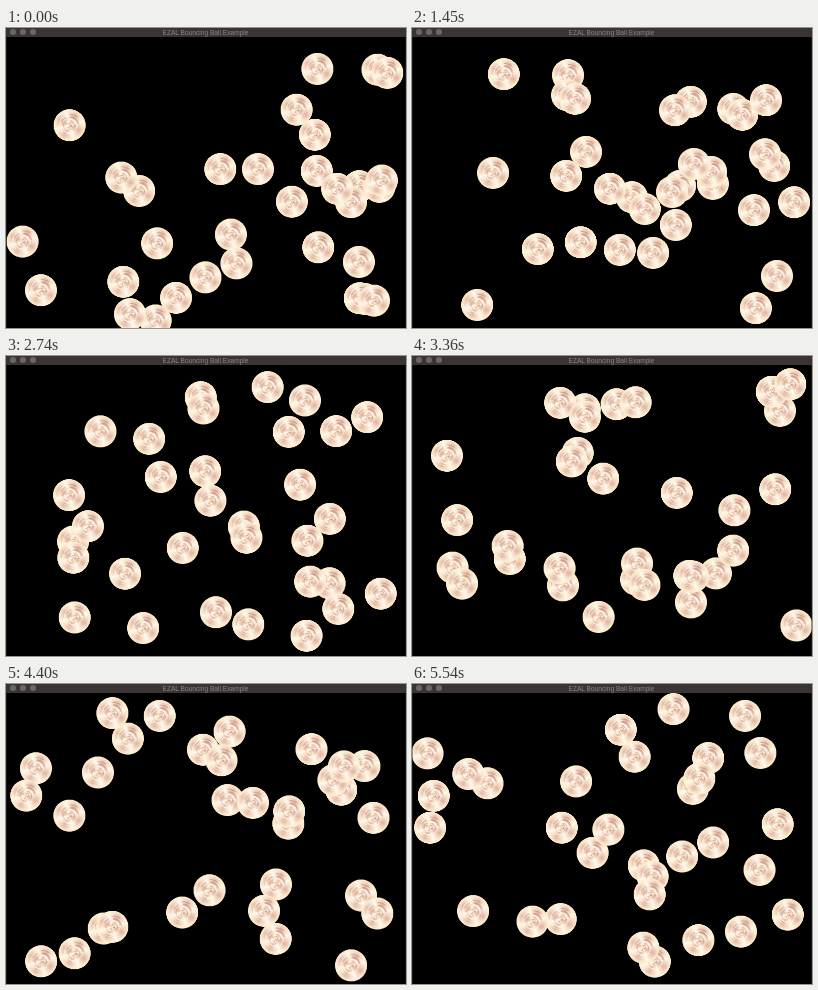
An HTML page with a canvas for the animation above (5640 ms loop, 400x300 px).

```html
<!DOCTYPE html>
<html lang="en">
<head>
<meta charset="utf-8">
<title>Bouncing balls</title>
<style>
  html, body { margin: 0; width: 100%; height: 100%; overflow: hidden; background: #000; }
  canvas { position: absolute; left: 0; top: 0; width: 400px; height: 300px; }
  .bar { position: absolute; left: 0; top: 0; width: 400px; height: 9px; background: #3a3533; }
  .bar i { position: absolute; top: 1px; width: 6px; height: 6px; border-radius: 50%; background: #6d6866; }
  .bar span {
    position: absolute; left: 0; width: 399px; top: 0; text-align: center; white-space: nowrap;
    font: 6.6px/9px "Liberation Sans", Arial, sans-serif; color: #8b8684;
  }
</style>
</head>
<body>
<canvas id="stage" width="400" height="300"></canvas>
<div class="bar">
  <i style="left:4px"></i><i style="left:14px"></i><i style="left:24px"></i>
  <span>EZAL Bouncing Ball Example</span>
</div>
<script>
const LOOP = 5640, LAST = 5540, MIDDLE = 2740;
const STEP = LAST / 119;
const SPEED = 0.01615;
const R = 16, SIZE = 2 * R + 2;
const WALLS = { left: 14.5, right: 384.5, top: 25, bottom: 293 };

// Each ball: place at MIDDLE, then whole-number speed along x and y; back to front.
const balls = [
  [70, 183, 10, -9], [177, 194, 1, 7], [136, 270, -4, -7], [65, 202, -8, 1],
  [117, 218, -7, 1], [239, 172, 4, 5], [323, 227, -2, -1], [93, 78, -5, 9],
  [144, 82, 3, -3], [195, 40, 1, -4], [196, 51, -5, -5], [259, 32, -9, 3],
  [301, 43, 7, -5], [281, 75, -6, -3], [331, 74, 3, -4], [362, 60, 3, -4],
  [153, 123, -6, 7], [198, 115, -4, -1], [205, 147, 2, 8], [292, 131, -7, 8],
  [61, 138, -7, -4], [84, 172, 7, 6], [239, 180, -5, -6], [302, 185, 2, 1],
  [325, 162, 4, -3], [303, 223, -4, -9], [332, 250, -1, -10], [375, 240, 1, 8],
  [71, 260, 8, -5], [212, 256, 7, -1], [242, 271, -1, 9], [300, 278, -2, -6]
];

// Steady redraws, with a slight slow wobble in the pace.
function pathAt(t) {
  const shown = Math.floor(Math.min(t, LAST) / STEP + 0.3) * STEP;
  return SPEED * (shown - MIDDLE) + 0.4 * Math.cos(2 * Math.PI * shown / LAST);
}

// Straight travel folded back and forth between two walls.
function bounce(p, lo, hi) {
  const span = hi - lo, period = 2 * span;
  const u = (((p - lo) % period) + period) % period;
  return lo + (u > span ? period - u : u);
}

function random(seed) {
  return () => (seed = (seed * 16807) % 2147483647) / 2147483647;
}

function makeBall() {
  const scale = 2;
  const c = document.createElement("canvas");
  c.width = c.height = SIZE * scale;
  const g = c.getContext("2d");
  g.scale(scale, scale);
  g.translate(SIZE / 2, SIZE / 2);
  g.beginPath();
  g.arc(0, 0, R, 0, 2 * Math.PI);
  g.clip();

  // Metallic sheen: light and dark sectors
  const sheen = g.createConicGradient(0.5, 0, 0);
  const sectors = 8;
  for (let i = 0; i <= sectors; i++)
    sheen.addColorStop(i / sectors, i % 2 ? "#fffbee" : "#e3b5a1");
  g.fillStyle = sheen;
  g.fillRect(-R, -R, 2 * R, 2 * R);

  // Brushed swirl
  const rnd = random(77);
  const tones = ["#c48f7f", "#fffaea", "#ecc5ae", "#fff3dc"];
  g.lineCap = "round";
  for (let i = 0; i < 44; i++) {
    const r = 1.5 + 11 * rnd(), a = 2 * Math.PI * rnd(), len = 0.4 + 1.1 * rnd();
    g.globalAlpha = 0.4 + 0.4 * rnd();
    g.strokeStyle = tones[i % tones.length];
    g.lineWidth = 0.7 + 0.9 * rnd();
    g.beginPath();
    g.ellipse(0, 0, r, r * 0.9, -0.5, a, a + len);
    g.stroke();
  }

  const rim = g.createRadialGradient(0, 0, R * 0.72, 0, 0, R);
  rim.addColorStop(0, "rgba(255, 240, 208, 0)");
  rim.addColorStop(1, "rgba(255, 240, 208, 1)");
  g.globalAlpha = 1;
  g.fillStyle = rim;
  g.fillRect(-R, -R, 2 * R, 2 * R);
  return c;
}

const ctx = document.getElementById("stage").getContext("2d");
const sprite = makeBall();
const start = performance.now();

function draw(now) {
  const s = pathAt(Math.max(0, now - start) % LOOP);
  ctx.fillStyle = "#000";
  ctx.fillRect(0, 0, 400, 300);
  for (const [x, y, vx, vy] of balls) {
    const bx = bounce(x + vx * s, WALLS.left, WALLS.right);
    const by = bounce(y + vy * s, WALLS.top, WALLS.bottom);
    ctx.drawImage(sprite, bx - SIZE / 2, by - SIZE / 2, SIZE, SIZE);
  }
  // Thin window edges
  ctx.fillStyle = "#2b2a2a";
  ctx.fillRect(0, 9, 0.5, 291);
  ctx.fillRect(399.5, 9, 0.5, 291);
  requestAnimationFrame(draw);
}
draw(start);
</script>
</body>
</html>
```
